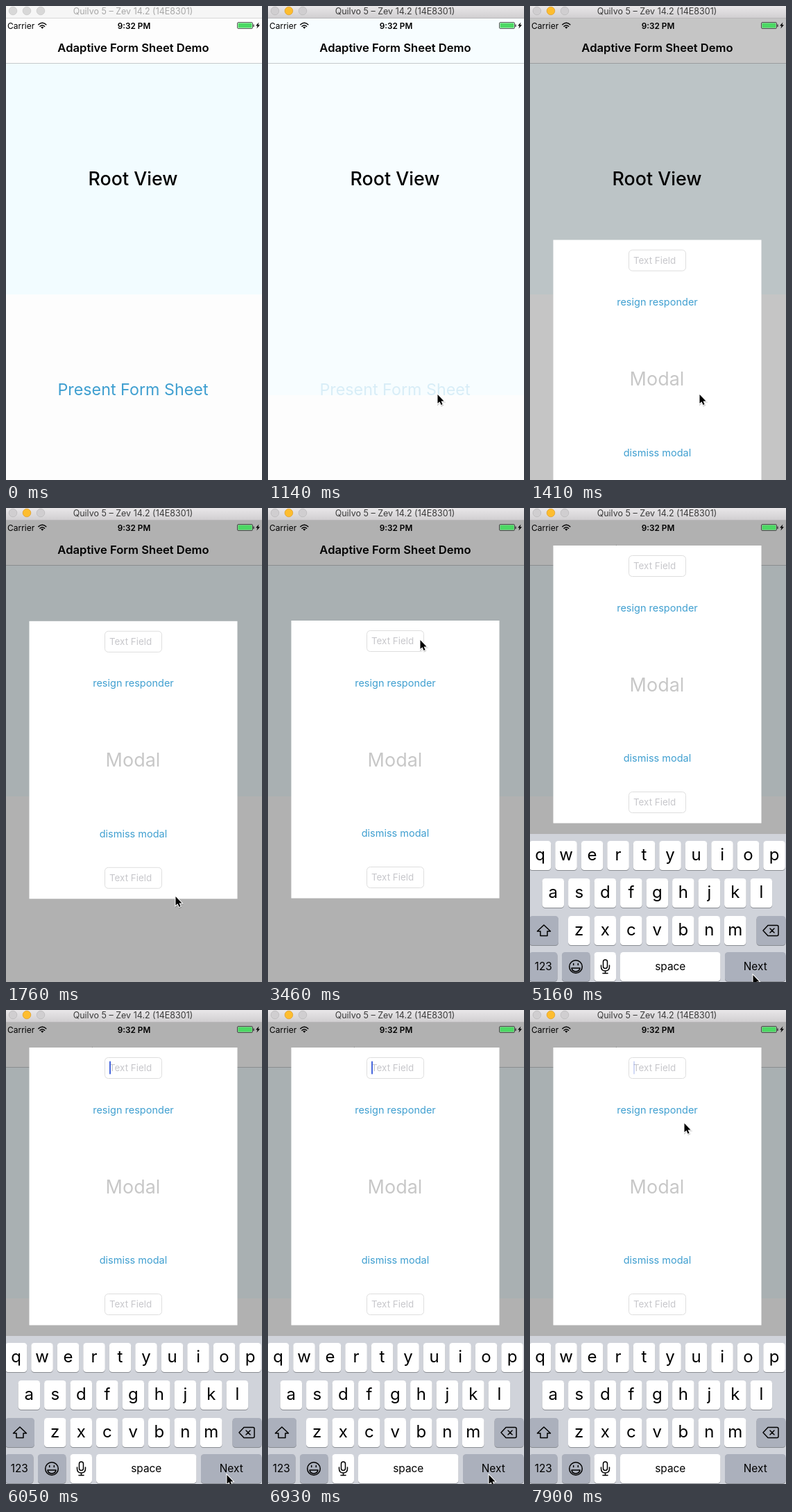
These frames come from a looping animation (369x682 px, 7.99 s). An HTML page:

```html
<!DOCTYPE html>
<html lang="en">
<head>
<meta charset="utf-8">
<title>Adaptive Form Sheet Demo</title>
<style>
html, body { margin: 0; width: 100%; height: 100%; overflow: hidden; background: #fdfdfd; }
svg { display: block; width: 369px; height: 682px; font-family: Inter, "Open Sans", sans-serif; }
text { text-anchor: middle; }
.link { fill: #3f9fd0; font-size: 14.5px; }
.hint { fill: #c7c7cb; font-size: 13.4px; text-anchor: start; }
.bold { font-weight: 600; }
.letter { font-size: 24px; }
.label { font-size: 15.4px; }
.line { fill: none; stroke: #000; stroke-width: 1.5; stroke-linecap: round; stroke-linejoin: round; }
</style>
</head>
<body>
<svg viewBox="0 0 369 682">
  <defs>
    <linearGradient id="chrome" x2="0" y2="1">
      <stop stop-color="#e9e7e9"/><stop offset="1" stop-color="#d1cfd1"/>
    </linearGradient>
    <path id="arrow" d="M.5 1V13.800L3.500 11.200L5.600 16L7.600 15.100L5.500 10.400H9.500Z"/>
  </defs>

  <rect width="369" height="682" fill="#fdfdfd"/>
  <rect id="root" y="83" width="369" height="332" fill="#f2fcff"/>
  <rect id="header" y="18" width="369" height="64" fill="#fdfdfd"/>
  <path d="M0 82.5H369" stroke="#c6cacc"/>
  <text class="bold" x="183.5" y="66" font-size="16.6">Adaptive Form Sheet Demo</text>
  <text x="183" y="258" font-size="26.8" font-weight="500">Root View</text>
  <text id="present" x="183" y="559.5" font-size="23.3" fill="#3f9fd0">Present Form Sheet</text>
  <rect id="dim" y="18" width="369" height="664"/>

  <g id="modal">
    <rect x="33.5" width="300" height="399.5" fill="#fff"/>
    <g id="fields"></g>
    <text class="link" x="183.5" y="94.5">resign responder</text>
    <text x="183" y="209.5" font-size="27" fill="#c8c8c8">Modal</text>
    <text class="link" x="183.5" y="311">dismiss modal</text>
    <rect id="caret" x="149" width="2" height="19" rx="1" fill="#4766dc"/>
  </g>

  <g id="keyboard">
    <rect y="469" width="369" height="214" fill="#d0d3da"/>
    <g id="keys"></g>
    <path class="line" d="M20 600L29.500 609H25V615.500H15V609H10.500Z"/>
    <path class="line" d="M343 600.500H356Q358 600.500 358 602.500V613.500Q358 615.500 356 615.500H343L336 608ZM346 605L352 611M352 605L346 611"/>
    <circle class="line" cx="66" cy="660" r="9.300"/>
    <path class="line" d="M60 662H72Q71 667 66 667T60 662Z"/>
    <path class="line" stroke-width="2" d="M62.700 655.500V657.500M69.300 655.500V657.500"/>
    <rect class="line" x="105.500" y="650" width="6" height="12.500" rx="3"/>
    <path class="line" d="M102.500 658V660Q102.500 666 108.500 666T114.500 660V658M108.500 666V669.500M105 669.500H112"/>
  </g>

  <g id="status">
    <text x="2" y="32.500" font-size="12" style="text-anchor:start">Carrier</text>
    <path class="line" stroke-linecap="butt" d="M46.800 26.800Q52.300 21.800 57.800 26.800M49 29.200Q52.300 26.200 55.600 29.200"/>
    <path d="M50.200 30.600Q52.300 29 54.400 30.600L52.300 32.800Z"/>
    <text class="bold" x="184.500" y="32.500" font-size="11.800">9:32 PM</text>
    <rect x="333.500" y="23.500" width="22" height="9" rx="1.500" fill="none" stroke="#333" stroke-width=".8"/>
    <rect x="334.500" y="24.500" width="20" height="7" rx=".5" fill="#4cd964"/>
    <path d="M356.500 26.500H357.500V30H356.500ZM364.500 23.500L360 28.600H362.600L361.300 32.500L366 27.200H363.400Z"/>
  </g>

  <rect id="bar" width="369" height="17"/>
  <path id="edge" d="M0 17.500H369"/>
  <g id="lights" stroke-width=".8"></g>
  <text id="caption" x="183" y="11.800" font-size="12.500">Quilvo 5 – Zev 14.2 (14E8301)</text>

  <g id="pointer">
    <use href="#arrow" x=".5" y="1.200" stroke="#000" stroke-width="2" opacity=".2"/>
    <use href="#arrow" stroke="#fff" stroke-width="2"/>
    <use href="#arrow"/>
  </g>
</svg>

<script>
const LOOP = 7990, TICK = LOOP / 90;
const el = id => document.getElementById(id);
const set = (id, attrs) => {
  for (const name in attrs) el(id).setAttribute(name, attrs[name]);
};

function key(x, y, width, text = "", dark = false, id = "") {
  const box = fill => `x="${x}" width="${width}" height="42" rx="4.5" fill="${fill}"`;
  const style = text.length > 1 ? "label" : "letter";
  const baseline = y + (text.length > 1 ? 26 : 27.5);
  return `<rect y="${y + 1}" ${box("#898c92")}/>
    <rect id="${id}" y="${y}" ${box(dark ? "#abb0bc" : "#fff")}/>
    <text class="${style}" x="${x + width / 2}" y="${baseline}">${text}</text>`;
}

function letterRow(letters, x, y) {
  return [...letters].map((c, i) => key(x + i * 37.5, y, 31.5, c)).join("");
}

function build() {
  el("keys").innerHTML =
    letterRow("qwertyuiop", -1.2, 479) + letterRow("asdfghjkl", 17.6, 533) +
    letterRow("zxcvbnm", 55, 587) +
    key(-1, 587, 42, "", true) + key(326.5, 587, 42, "", true) +
    key(-1, 639, 40.5, "123", true) + key(46, 639, 40.5, "", true) +
    key(92.5, 639, 31.5) + key(130, 639, 144.5, "space") +
    key(281, 639, 87.5, "Next", true, "next");
  el("fields").innerHTML = [14.5, 354.5].map(y =>
    `<rect x="142.5" y="${y}" width="82" height="30" rx="5" fill="#fff" stroke="#dedede"/>
     <text class="hint" x="149" y="${y + 19.5}">Text Field</text>`).join("");
  el("lights").innerHTML = [10, 30, 50].map((x, i) =>
    `<circle id="light${i}" cx="${x}" cy="7" r="5.8"/>`).join("");
}

// Critically damped spring, 0 to 1, over a time in ticks.
function spring(ticks) {
  const s = Math.max(0, ticks) * TICK / 1000 * 18.26;
  return 1 - (1 + s) * Math.exp(-s);
}

// Pointer moves: first tick, last tick, start, bend, end.
const moves = [
  [7, 10, [325, 567], [285, 566], [244, 558]],
  [22, 29, [244, 558], [191, 350], [219, 189]],
  [54, 58, [219, 189], [285, 430], [321, 671]],
  [58, 60, [321, 671], [319, 670], [318, 668]],
  [82, 89, [318, 668], [280, 400], [222, 162]]
];

function pointerAt(n) {
  const [first, last, a, b, c] = moves.filter(m => n >= m[0]).pop() || moves[0];
  const u = Math.min(1, Math.max(0, (n - first) / (last - first)));
  const s = u * u * (3 - 2 * u);
  return a.map((v, i) => v * (1 - s) ** 2 + 2 * b[i] * s * (1 - s) + c[i] * s * s);
}

// Each focus change restarts the blink and swaps the field.
const focusTicks = [38, 63, 68, 73, 78];

function caretAt(n) {
  const index = focusTicks.filter(f => n >= f).length - 1;
  if (n < 40) return { opacity: 0 };
  const k = (n - focusTicks[index]) % 12;
  const opacity = k < 5 ? 1 : k === 5 ? 0.5 : k === 11 ? 0.25 : 0;
  return { opacity, y: index % 2 ? 359.5 : 19.5 };
}

function draw(time) {
  const n = Math.min(89, Math.floor((time + 15) / TICK));
  const active = n >= 13, touched = n === 13 || n === 14;

  set("bar", { fill: active ? "url(#chrome)" : "#f6f6f6" });
  set("edge", { stroke: active ? "#b9b7b9" : "#d8d8d8" });
  set("caption", { fill: active ? "#3a3a3a" : "#a8a8a8" });
  for (let i = 0; i < 3; i++) {
    const lit = active && i === 1;
    set("light" + i, {
      fill: lit ? "#fdbd2f" : active ? "#d0ced0" : "#d8d8d8",
      stroke: lit ? "#e0a02c" : active ? "#bcbabc" : "#cacaca"
    });
  }

  set("root", { height: touched ? 477 : 332, fill: touched ? "#f7fdff" : "#f2fcff" });
  set("header", { fill: touched ? "#f7fdff" : "#fdfdfd" });
  set("present", { opacity: touched ? 0.16 : 1 });

  const shown = spring(n - 14.594), raised = spring(n - 39.5);
  set("dim", { opacity: 0.3 * Math.min(1, shown * 1.12) });
  set("modal", { transform: `translate(0 ${682 - 520 * shown - 108 * raised})` });
  set("keyboard", { transform: `translate(0 ${214 * (1 - raised)})` });
  set("caret", caretAt(n));

  const pressed = n >= 61 && n < 78 && (n - 61) % 5 < 2;
  set("next", { fill: pressed ? "#fff" : "#abb0bc" });
  set("pointer", { transform: `translate(${pointerAt(n)})`, opacity: n < 7 ? 0 : 1 });
}

build();
const start = performance.now();
function frame() {
  draw((performance.now() - start) % LOOP);
  requestAnimationFrame(frame);
}
frame();
</script>
</body>
</html>
```
